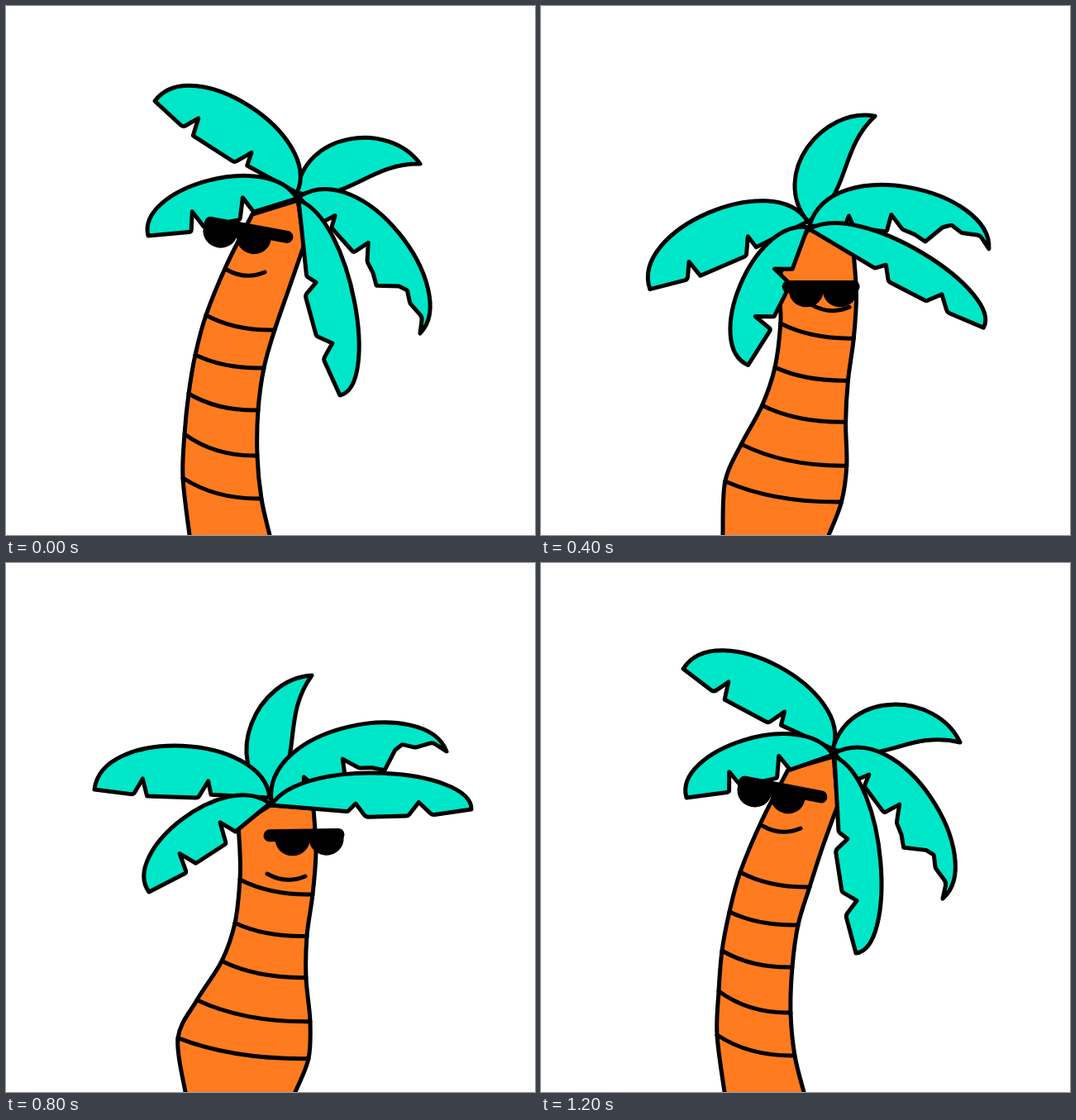
An HTML page with a canvas that plays this animation: 640x640 px, repeating every 1.3 s.

```html
<!DOCTYPE html>
<html lang="en">
<head>
<meta charset="utf-8">
<title>Dancing palm</title>
<style>
html, body { margin: 0; width: 100%; height: 100%; overflow: hidden; background: #fff; }
canvas { display: block; width: 100vw; height: 100vh; }
</style>
</head>
<body>
<canvas id="stage" width="640" height="640"></canvas>
<script>
const ctx = document.getElementById('stage').getContext('2d');
const LOOP = 1300, STEP = 100;
const GREEN = '#00e6c8', ORANGE = '#ff7b1f';

// Every track below has one row per key time.
const KEYS = [0, 200, 500, 700, 800, 1000, 1200];
const crown = [[353, 230], [317, 294], [330, 247], [338, 239], [320, 288], [317, 294], [354, 229]];

// Left and right trunk edges: shoulder y, then x at shoulder, middle, five rings, ground.
const trunkLeft = [
  [252, 298, 267, 242, 229, 221, 216, 214, 222],
  [350, 269, 267, 265, 258, 241, 207, 193, 215],
  [300, 300, 299, 300, 293, 279, 260, 239, 223],
  [276, 291, 303, 307, 300, 288, 273, 254, 227],
  [318, 281, 283, 283, 277, 261, 231, 208, 217],
  [335, 270, 267, 264, 256, 241, 208, 194, 215],
  [250, 299, 267, 241, 228, 219, 215, 213, 222]];
const trunkRight = [
  [288, 361, 343, 325, 312, 305, 304, 309, 319],
  [330, 358, 354, 349, 341, 343, 359, 363, 350],
  [274, 387, 394, 391, 384, 378, 371, 360, 345],
  [236, 389, 403, 402, 393, 383, 371, 358, 342],
  [297, 372, 375, 371, 364, 363, 368, 366, 350],
  [328, 358, 353, 348, 340, 340, 357, 361, 348],
  [293, 359, 341, 325, 311, 304, 302, 307, 318]];
const ringLift = [[1], [.1], [0], [0], [.1], [.1], [1]];
const LIFT = [10, 15, 14, 12, 4];
const RING_LEFT = [384, 437, 483, 530, 575];
const RING_RIGHT = [402, 453, 503, 556, 600];

// Glasses x, y, tilt in degrees, arm ends, lens depth; then smile x, y.
const face = [
  [281, 268.5, 10.5, -34, 60, 28, 267, 319],
  [291, 339, 2.5, -34, 43, 24, 284, 379],
  [367, 329, -1, -48, 35, 25.5, 346, 348],
  [401, 279, -4.3, -66, 34, 28, 355, 334],
  [367, 329, -1, -48, 35, 25, 316, 376],
  [311.5, 354.5, 0, -34, 34, 21.5, 281, 378],
  [280, 271.5, 11, -34, 60, 28, 268, 318]];

// Outlines run from the tip: u along the leaf, v towards the outer edge, optional corner radius.
const leaves = {
  top: {
    side: 1, length: 206, root: [-1, -4], outer: [5, 76, 195, 76],
    inner: [[46, -8, 5], [56, 11], [62, -10], [122, -10, 5], [133, 11], [137, -5]],
    tips: [[180, 115], [120, 355], [133, 315], [124, 255], [107, 274], [112, 308], [172, 128]],
    bend: [0, 1, 2, 8, 6, 4, 1]
  },
  low: {
    side: 1, length: 183, root: [-1, 3], outer: [0, 60, 165, 66],
    inner: [[51, -8, 3], [58, 15.5], [67, -5.5], [111, -8, 3], [120.5, 17], [129, -3]],
    tips: [[172, 278], [200, 440], [260, 417], [198, 359], [173, 398], [182, 419], [176, 284]],
    bend: [0, 0, 0, 0, 0, 0, 0]
  },
  back: {
    side: -1, length: 154, root: [-1, -4], outer: [25, 60, 130, 70], innerCurve: [60, 16, 100, -28],
    tips: [[501, 191], [460, 240], [366, 96], [332, 79], [370, 136], [465, 247], [507, 217]],
    bend: [0, 0, 0, 4, 3, 0, 3]
  },
  right: {
    side: -1, length: 220, root: [1, 1], outer: [5, 72, 205, 92],
    inner: [[13, 15, 8], [35, 15, 6], [49, 23, 3], [59, 19, 3], [78, -1], [92, 6, 4], [107, 10, 6],
      [123, 26], [126, 5, 3], [166, 5, 4], [174, 18], [178, 2, 3]],
    tips: [[501, 396], [525, 370], [550, 245], [519, 109], [533, 228], [535, 342], [486, 406]],
    bend: [0, 0, 0, 1, 0, 0, 0]
  },
  front: {
    side: -1, length: 241, root: [1, 5], outer: [0, 50, 205, 62],
    inner: [[47, -6, 6], [63.5, 9.5], [76, -7, 4], [127, -9, 6], [139.5, 7], [149, -3, 4]],
    tips: [[404, 471], [500, 460], [555, 343], [576, 187], [563, 298], [522, 432], [381, 472]],
    bend: [-7, 0, 0, -7, -3, 0, -2]
  }
};

// Leaves swing, so their tips become angle, length and bend.
for (const leaf of Object.values(leaves)) {
  leaf.swing = leaf.tips.map(([x, y], i) => {
    const dx = x - crown[i][0] - leaf.root[0], dy = y - crown[i][1] - leaf.root[1];
    const angle = Math.atan2(dy, dx);
    return [angle < -1.8 ? angle + 2 * Math.PI : angle, Math.hypot(dx, dy), leaf.bend[i]];
  });
}

// Smooth cyclic interpolation through the key rows.
function sample(rows, t) {
  const n = KEYS.length;
  const time = k => KEYS[(k + n) % n] + Math.floor(k / n) * LOOP;
  const row = k => rows[(k + n) % n];
  let i = n - 1;
  while (KEYS[i] > t) i--;
  const span = time(i + 1) - time(i), s = (t - time(i)) / span;
  const slope = (k, c) => (row(k + 1)[c] - row(k - 1)[c]) / (time(k + 1) - time(k - 1)) * span;
  const ease = s * s * (3 - 2 * s);
  return row(i).map((a, c) => a + (row(i + 1)[c] - a) * ease
    + s * (1 - s) * ((1 - s) * slope(i, c) - s * slope(i + 1, c)));
}

function paint(fill) {
  if (fill) {
    ctx.fillStyle = fill;
    ctx.fill();
  }
  ctx.stroke();
}

function drawLeaf(leaf, t) {
  const [cx, cy] = sample(crown, t);
  const [angle, length, bend] = sample(leaf.swing, t);
  const x0 = cx + leaf.root[0], y0 = cy + leaf.root[1];
  const ux = -Math.cos(angle), uy = -Math.sin(angle);
  const at = (u, v) => {
    const s = u / leaf.length, d = s * length - length;
    const w = leaf.side * (v + bend * 4 * s * (1 - s));
    return [x0 + ux * d + uy * w, y0 + uy * d - ux * w];
  };
  const [a, b, c, d] = leaf.outer;
  const root = at(leaf.length, 0);
  ctx.beginPath();
  ctx.moveTo(...root);
  ctx.bezierCurveTo(...at(c, d), ...at(a, b), ...at(0, 0));
  if (leaf.innerCurve) {
    const [e, f, g, h] = leaf.innerCurve;
    ctx.bezierCurveTo(...at(e, f), ...at(g, h), ...root);
  } else {
    leaf.inner.forEach(([u, v, r], i) => {
      const next = leaf.inner[i + 1] || [leaf.length, 0];
      if (r) ctx.arcTo(...at(u, v), ...at(next[0], next[1]), r);
      else ctx.lineTo(...at(u, v));
    });
  }
  ctx.closePath();
  paint(GREEN);
}

function edge(rows, ringY, t) {
  const [top, ...xs] = sample(rows, t), [lift] = sample(ringLift, t);
  const ys = ringY.map((y, i) => y - lift * LIFT[i]);
  const all = [top, (top + ys[0]) / 2, ...ys, 640];
  return xs.map((x, i) => [x, all[i]]);
}

function spline(p) {
  for (let i = 0; i < p.length - 1; i++) {
    const a = p[i], b = p[i + 1], before = p[i - 1] || a, after = p[i + 2] || b;
    ctx.bezierCurveTo(
      a[0] + (b[0] - before[0]) / 6, a[1] + (b[1] - before[1]) / 6,
      b[0] - (after[0] - a[0]) / 6, b[1] - (after[1] - a[1]) / 6, ...b);
  }
}

function drawTrunk(t) {
  const [cx, cy] = sample(crown, t);
  const left = edge(trunkLeft, RING_LEFT, t), right = edge(trunkRight, RING_RIGHT, t);
  ctx.beginPath();
  ctx.moveTo(cx, cy + 5);
  ctx.lineTo(...left[0]);
  spline(left);
  ctx.lineTo(left[7][0] + 3, 650);
  ctx.lineTo(right[7][0], 650);
  ctx.lineTo(...right[7]);
  spline(right.reverse());
  ctx.closePath();
  paint(ORANGE);
  right.reverse();
  for (let i = 2; i < 7; i++) {
    const [lx, ly] = left[i], [rx, ry] = right[i];
    ctx.beginPath();
    ctx.moveTo(lx, ly);
    ctx.quadraticCurveTo(lx + (rx - lx) * .42, ry + 1, rx, ry);
    paint();
  }
}

function line(x1, y1, x2, y2) {
  ctx.beginPath();
  ctx.moveTo(x1, y1);
  ctx.lineTo(x2, y2);
  ctx.stroke();
}

function drawSmile(t) {
  const [x, y] = sample(face, t).slice(6);
  ctx.beginPath();
  ctx.moveTo(x, y);
  ctx.quadraticCurveTo(x + 23, y + 13, x + 46, y + 3);
  paint();
}

function drawGlasses(t) {
  const [x, y, tilt, armLeft, armRight, depth] = sample(face, t);
  ctx.save();
  ctx.translate(x, y);
  ctx.rotate(tilt * Math.PI / 180);
  ctx.fillStyle = '#000';
  ctx.lineWidth = 15;
  line(armLeft, 0, armRight, 0);
  for (const lens of [-20.5, 20.5]) {
    ctx.beginPath();
    ctx.moveTo(lens - 21, 0);
    ctx.lineTo(lens + 21, 0);
    ctx.ellipse(lens, depth - 20, 21, 20, 0, 0, Math.PI);
    ctx.fill();
  }
  if (t >= 600 && t < 800) {
    ctx.strokeStyle = '#fff';
    ctx.lineWidth = 5.5;
    ctx.lineCap = 'butt';
    line(-13, -1, -25, 23);
    line(29, -1, 19, 21);
  }
  ctx.restore();
}

function draw(t) {
  ctx.fillStyle = '#fff';
  ctx.fillRect(0, 0, 640, 640);
  ctx.strokeStyle = '#000';
  ctx.lineWidth = 5;
  ctx.lineCap = ctx.lineJoin = 'round';
  drawLeaf(leaves.back, t);
  drawLeaf(leaves.top, t);
  drawLeaf(leaves.right, t);
  drawTrunk(t);
  drawSmile(t);
  drawLeaf(leaves.front, t);
  drawLeaf(leaves.low, t);
  drawGlasses(t);
}

const start = performance.now();
function tick() {
  const ms = (performance.now() - start) % LOOP;
  draw(Math.floor(ms / STEP) * STEP);
  requestAnimationFrame(tick);
}
tick();
</script>
</body>
</html>
```
